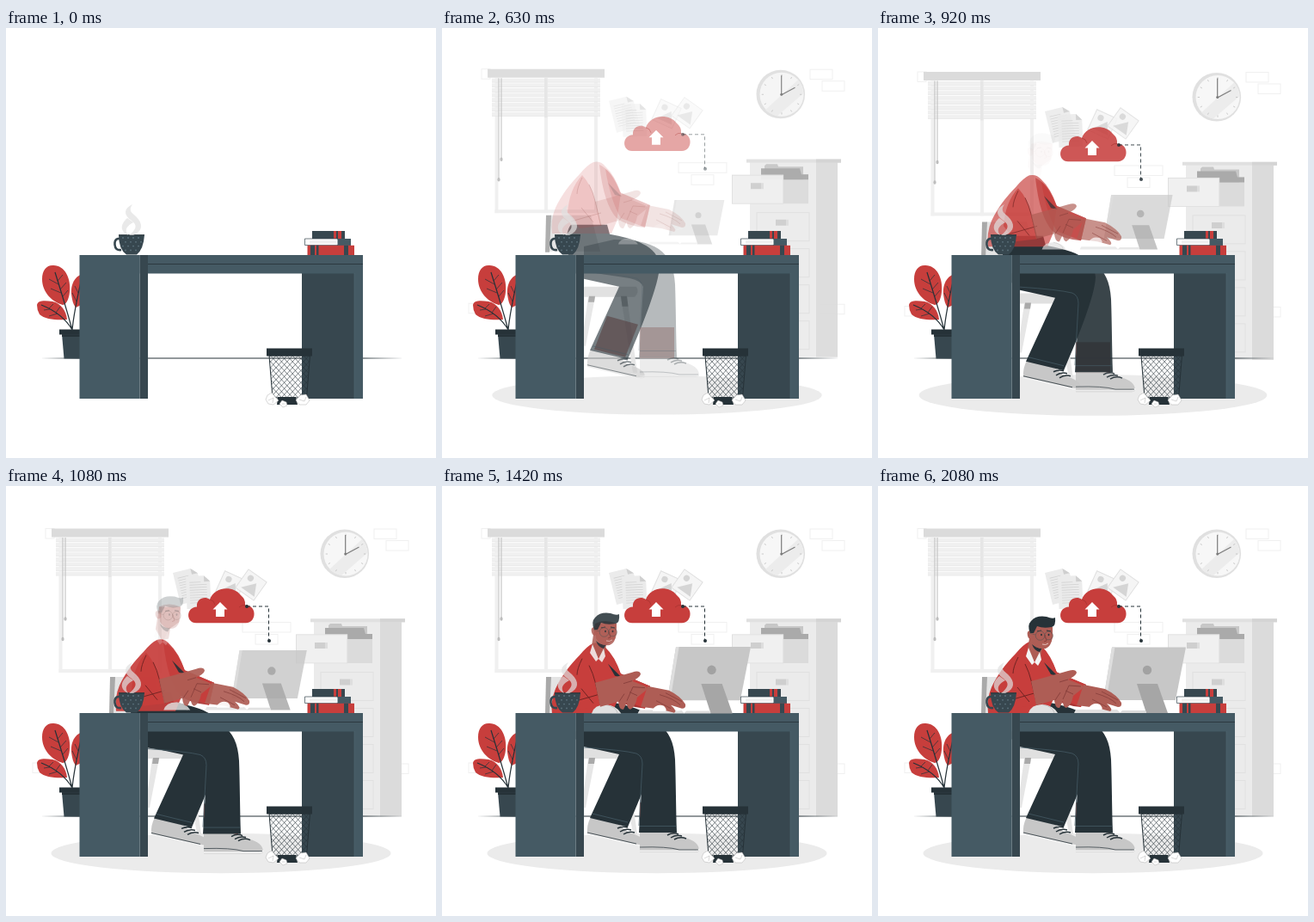
An HTML page with a canvas for the animation above (2120 ms loop, 500 by 500 pixels).

```html
<!DOCTYPE html>
<html lang="en">
<head>
<meta charset="utf-8">
<title>Working at the desk</title>
<style>
html, body { margin: 0; width: 100%; height: 100%; overflow: hidden; background: #fff; }
canvas { display: block; width: 500px; height: 500px; }
</style>
</head>
<body>
<canvas id="stage"></canvas>
<script>
const canvas = document.getElementById('stage');
const ctx = canvas.getContext('2d');
const dpr = window.devicePixelRatio || 1;
canvas.width = canvas.height = 500 * dpr;

const LOOP = 2120, FPS = 24;
const INK = '#263238', SLATE = '#455a64', DEEP = '#37474f';
const RED = '#c73e3c', SKIN = '#ae5d55', PALE = '#ebebeb';

// Drawing helpers
const paths = new Map();
const path = d => {
  if (!paths.has(d)) paths.set(d, new Path2D(d));
  return paths.get(d);
};
function fill(color, d) { ctx.fillStyle = color; ctx.fill(path(d)); }
function line(color, w, d) { ctx.strokeStyle = color; ctx.lineWidth = w; ctx.stroke(path(d)); }
function rect(color, x, y, w, h) { ctx.fillStyle = color; ctx.fillRect(x, y, w, h); }
function box(color, w, x, y, bw, bh) { ctx.strokeStyle = color; ctx.lineWidth = w; ctx.strokeRect(x, y, bw, bh); }
function oval(color, x, y, rx, ry = rx, turn = 0) {
  ctx.fillStyle = color;
  ctx.beginPath();
  ctx.ellipse(x, y, rx, ry, turn, 0, 7);
  ctx.fill();
}
function ring(color, w, x, y, r) {
  ctx.strokeStyle = color;
  ctx.lineWidth = w;
  ctx.beginPath();
  ctx.arc(x, y, r, 0, 7);
  ctx.stroke();
}

// Easing
function bezier(x1, y1, x2, y2) {
  const at = (a, b, u) => 3 * (1 - u) * (1 - u) * u * a + 3 * (1 - u) * u * u * b + u * u * u;
  return x => {
    if (x <= 0) return 0;
    if (x >= 1) return 1;
    let lo = 0, hi = 1;
    for (let i = 0; i < 24; i++) {
      const mid = (lo + hi) / 2;
      if (at(x1, x2, mid) < x) lo = mid; else hi = mid;
    }
    return at(y1, y2, lo);
  };
}
const back = bezier(.36, -.01, .5, 1.38);
const easeIn = bezier(.42, 0, 1, 1);

function slide(p, dist, draw) {
  if (p <= 0) return;
  ctx.save();
  ctx.globalAlpha = Math.min(1, p);
  ctx.translate(0, dist * (p - 1));
  draw();
  ctx.restore();
}
function zoom(p, x, y, draw) {
  if (p <= 0) return;
  const s = .5 + p / 2;
  ctx.save();
  ctx.globalAlpha = Math.min(1, p);
  ctx.translate(x, y);
  ctx.scale(s, s);
  ctx.translate(-x, -y);
  draw();
  ctx.restore();
}

// Scenery
function bricks() {
  for (const [x, y, w] of [[428, 50, 26], [442, 63.5, 26], [275, 158.5, 56], [290, 172.5, 26], [46, 49.5, 10], [31, 322, 24], [440, 323, 28]])
    box('#f0f0f0', 1, x, y, w, 11.5);
}

function blinds() {
  for (const x of [61.5, 119, 177]) rect('#f0f0f0', x, 60, 4, 157);
  rect('#f0f0f0', 61.5, 213, 119.5, 4);
  for (let y = 60.5; y < 104; y += 5.6) {
    rect('#f0f0f0', 58, y, 126, 4.6);
    rect('#e8e8e8', 58, y + 4, 126, .7);
  }
  rect('#e6e6e6', 119, 60, 3.5, 46);
  rect('#dbdbdb', 53, 49.5, 136, 10);
  line('#bdbdbd', 1, 'M66 60V178 M69 60V155');
  oval('#bdbdbd', 66, 178, 1.6, 2.2);
  oval('#bdbdbd', 69, 154.5, 1.6, 2.2);
}

function clock() {
  oval('#e0e0e0', 393.8, 78.8, 28.3);
  oval('#f7f7f7', 395, 79, 25.5);
  fill('#ececec', 'M376 97L414 62Q420 69 420 78L390 104Q381 102 376 97Z');
  ctx.strokeStyle = '#bdbdbd';
  ctx.lineWidth = .8;
  ctx.beginPath();
  for (let i = 0; i < 12; i++) {
    const c = Math.cos(i * Math.PI / 6), s = Math.sin(i * Math.PI / 6);
    ctx.moveTo(395 + 21 * c, 79 + 21 * s);
    ctx.lineTo(395 + 23.3 * c, 79 + 23.3 * s);
  }
  ctx.stroke();
  line('#7c7c7c', 1.2, 'M394.7 57V79.5L410.5 71');
  oval('#7c7c7c', 394.7, 79, 1.5);
}

function cabinet() {
  rect(PALE, 358, 158, 77, 226.5);
  rect('#dbdbdb', 435, 158, 25, 226.5);
  rect('#e0e0e0', 354, 154.3, 110, 4);
  rect('#d4d4d4', 435, 154.3, 29, 4);
  for (let i = 0; i < 4; i++) {
    const y = 216.5 + i * 42;
    box('#e0e0e0', 1, 366, y, 61, 33);
    rect('#cfcfcf', 388, y + 8, 12, 7);
    rect('#dedede', 400, y + 8, 3, 7);
  }
  rect('#dbdbdb', 397, 172, 29, 34);
  fill('#c7c7c7', 'M375 162L377 160H390L391 163H420V178H375Z');
  fill('#aaaaaa', 'M371 165H416L418 172H426V178H371Z');
  rect('#f0f0f0', 337, 172.5, 60, 33.5);
  box('#dedede', .8, 337.4, 172.9, 59.4, 33);
  rect('#cfcfcf', 359, 182, 12, 7);
  rect('#dedede', 371, 182, 3, 7);
}

function sky() {
  bricks();
  blinds();
  clock();
  cabinet();
}

function sheet(x, y, turn) {
  ctx.save();
  ctx.translate(x, y);
  ctx.rotate(turn);
  fill('#ebebeb', 'M0 0H21L28 7V38H0Z');
  fill('#cfcfcf', 'M21 0V7H28Z');
  for (let i = 0; i < 9; i++) rect('#d3d3d3', 4, 7 + i * 3, i < 1 ? 13 : 20, .8);
  ctx.restore();
}

function photo(x, y, turn) {
  ctx.save();
  ctx.translate(x, y);
  ctx.rotate(turn);
  rect('#f5f5f5', -13, -13, 26, 26);
  box('#e0e0e0', 1, -13, -13, 26, 26);
  oval('#d5d5d5', -5, -6, 3.6);
  fill('#d5d5d5', 'M-8 9L4 -5L11 9Z');
  ctx.restore();
}

function upload() {
  sheet(194, 101, -.24);
  sheet(209, 105, -.04);
  photo(261, 116, .43);
  photo(285, 115, .62);
  // the arrow winds the other way, so it stays open
  fill(RED, 'M221 159.3C209 159 209 141 222 140.5C221 131 231 127.5 237 132C242 117 264 115 273 127Q279 132 278 138.5C292 138 292 159 279 159.3Z M240.5 143.5H244V152H254V143.5H257.5L249 135Z');
  line('#a93432', .8, 'M237 132Q242 133 243 138 M278 138.5Q274 138 271 141');
  ctx.setLineDash([4, 3]);
  line(INK, 1, 'M280 140H305.5V179');
  ctx.setLineDash([]);
  oval(INK, 280, 140, 2);
  oval(INK, 306, 180, 2);
}

function plant() {
  fill(RED, 'M54 276C68 275 76 291 74 307C73 317 69 322 66 322C55 319 42 308 42 292C42 282 47 276 54 276Z');
  fill(RED, 'M92 286C82 286 75 296 76 309Q77 320 81 325L92 320Z');
  fill(RED, 'M36 322C37 316 46 317 54 318C64 320 70 329 71 339C60 340 45 339 39 333Q36 328 36 322Z');
  line(INK, 1.2, 'M77 351Q69 322 57 284 M77 351Q66 332 41 322 M77 351Q79 330 88 291');
  line(INK, .7, 'M60 294L66 287M63 304L70 296M66 312L72 305M61 298L50 292M64 308L52 303M50 326L55 321M58 331L63 324M51 327L44 328M60 332L50 335M82 318L77 308M84 308L80 300');
  fill(DEEP, 'M65 356H94L91 384.5H67.5Z');
  rect(INK, 62, 350.5, 34, 6);
  rect(INK, 65, 356.5, 30, 2.5);
}

function chair() {
  fill('#e4e4e4', 'M126 222H173L184 264H125Z');
  fill('#a9a9a9', 'M121 222H127L125 265H120Z');
  fill('#e0e0e0', 'M160 305H226Q230 311 224 317H160Z');
  fill('#e6e6e6', 'M170 317H178L167 374H162Z M208 317H215L227 405H222Z');
  fill('#a9a9a9', 'M171 316H178L177 323H170Z M208 316H215L216.5 328H209.5Z');
}

// Person
function rearLeg() {
  fill(SKIN, 'M192 346L228 356L213 394L177 385Z');
  fill('#c7c7c7', 'M173 385L207 394Q213 402 224 405Q237 410 236 417Q234 420 225 418L169 405Q168 394 173 385Z');
  line('#f2f2f2', 1.8, 'M169 404.5L226 417.5Q232 419 236 416');
  line(INK, .8, 'M169 403L226 416');
  fill(INK, 'M150 240L192 240L195 251C222 256 252 264 253 288C252 310 234 355 216 396.5L172 386L206 312L165 303C145 293 140 250 150 240Z');
  line(SLATE, .8, 'M175 381L216 391');
  line(INK, 1.5, 'M204 398Q210 395 216 397M207 402Q213 398 220 400M211 405Q217 401 224 403');
}

function frontLeg() {
  fill(SKIN, 'M230 368H270V404H230Z');
  fill('#c7c7c7', 'M230 402H262Q276 405 282 409Q299 413 299 424Q298 426 293 426H230Z');
  line('#f2f2f2', 1.8, 'M230 424.5H293Q298 425 299 422');
  line(INK, .7, 'M230 420Q262 419 276 423H298');
  fill(INK, 'M165 274L200 266C246 266 269 278 271 318C272 345 272 375 273 403H229L234 321Q232 314 218 311L165 303Z');
  line(SLATE, .8, 'M165 304Q210 307 226 311Q233 314 233 323L229 395 M230 395.5H272');
  line(INK, 1.5, 'M262 406Q269 402 275 405M266 409Q272 405 279 407M270 411Q277 407 284 410');
}

function torso() {
  fill('#a93432', 'M183 184Q197 190 207 216L242 231L236 257Q214 255 203 246Q188 230 183 184Z');
  fill(RED, 'M190 189Q199 194 208 217L242 231L236 257L208 246Q196 226 190 189Z');
  fill(RED, 'M128 264Q126 248 132 234C139 219 149 206 160 195Q169 184 176 181Q184 179 190 186Q201 196 208 217L203 250L197 264Z');
  fill(RED, 'M163 196Q148 212 146 240L160 258L185 255L178 226Q174 208 163 196Z');
  fill(INK, 'M193 205L209 221L201 219Z');
  line('#702423', 1, 'M171 207Q176 217 178 226L185 255 M150 250L185 240 M162 234L176 251 M163 199Q157 211 157 218');
}

function hands() {
  fill(SKIN, 'M239 231L264 236Q278 243 283 252Q284 257 279 257L266 253Q274 260 270 262L255 258L231 255Z');
  line('#873f3b', .8, 'M253 241Q270 246 277 253 M249 248L266 257 M260 239L279 249');
  fill(SKIN, 'M178 227Q200 221 221 215Q230 212 231 217Q230 221 221 225L236 231Q240 233 237 236L227 244Q225 255 219 258Q215 257 215 250L211 258Q206 259 205 249L184 255Z');
  line('#873f3b', .9, 'M221 225L211 228 M236 233L222 232L215 248 M227 242L218 238 M206 249L212 240');
  fill('#fff', 'M245 258Q250 251 258 254Q262 258 260 260H245Z M272 260Q276 255 280 259Z');
}

function head() {
  fill(SKIN, 'M178 164L203 164L201 182L191 189L189 201L181 203L174 190Z');
  fill(INK, 'M179 184Q186 190 191 188L188 193Q182 192 179 184Z');
  fill('#f4f4f4', 'M175 188L182 205L179 208L172 198Z M182 205L188 193L190 202L186 209Z');
  fill(SKIN, 'M178 164Q189 158 203 164L203 176Q201 187 195 189Q184 191 179 181Z');
  oval(SKIN, 177, 173, 3.2, 4.8, -.2);
  fill(INK, 'M177 171Q173 162 178 157Q184 150 196 152Q203 155 206 153Q207 163 202 164Q192 166 185 163L181 171Z');
  line(INK, 1.1, 'M185 169L190 168 M196 168L201 169');
  ring('#6b5653', .8, 188.5, 174, 5.3);
  ring('#6b5653', .8, 198.5, 174, 4.8);
  line('#6b5653', .7, 'M183 173L176 171 M193.5 173H194');
  oval(INK, 190, 173, .9, 1.3);
  oval(INK, 198.5, 173, .9, 1.3);
  line('#873f3b', .9, 'M194 173L196 180L193 181');
  line('#f1d6d2', .8, 'M191 184Q195 185.5 198 183');
}

// Furniture and desk items
function desk() {
  rect(DEEP, 344, 284, 62, 147);
  rect(SLATE, 155, 264, 260, 21.5);
  rect(SLATE, 405, 264, 10, 167);
  rect(SLATE, 85.5, 264, 70, 167);
  rect(DEEP, 155.5, 264, 9.5, 167);
  line(INK, .8, 'M165 274.5H415');
  line('#71828a', .6, 'M155.5 264V431');
  line('#536872', .6, 'M405 285V431');
}

function computer() {
  fill('#c7c7c7', 'M272 187.5H358L346 249H262Z');
  fill('#dedede', 'M272 187.5H275.5L265.5 249H262Z');
  oval('#a2a2a2', 313, 214, 5.2);
  fill('#a6a6a6', 'M301 230H325L337 264H312Z');
  fill('#dbdbdb', 'M284 261H311L312 264H281Z');
  fill('#e0e0e0', 'M230 260H278L282 264H228Z');
  fill('#e0e0e0', 'M175 264Q178 254 191 254Q204 255 209 264Z');
  line('#b5b5b5', .7, 'M191 254Q203 256 205 264');
}

function cup() {
  line(DEEP, 2.6, 'M134 245H130Q126 246 126.5 252Q127 259 134 258');
  fill(DEEP, 'M131 240.5H161Q160 257 152 263.5H140Q131 257 131 240.5Z');
  for (let r = 0; r < 4; r++)
    for (let i = 0; i < 4 - (r > 2); i++) oval('#5d737e', 136 + i * 6 + (r % 2) * 3, 244 + r * 4.8, .9);
  rect(INK, 131, 240.3, 30, 1);
}

function steam() {
  ctx.save();
  ctx.globalAlpha = .7;
  fill('#e0e0e0', 'M147 205C142 212 146 215 151 219C160 228 159 236 148 241H143C152 234 153 229 146 224C136 217 137 210 147 205Z M141 221C133 228 132 236 142 241C137 234 141 230 148 226Z');
  ctx.restore();
}

function books() {
  rect(DEEP, 356, 236, 38, 9);
  rect(RED, 381, 236, 3, 9);
  rect(RED, 386, 236, 4, 9);
  rect(SLATE, 385, 245, 16, 8);
  rect('#fff', 347.5, 245.5, 38, 7);
  line(DEEP, .7, 'M386 245H347.5V252.5H386');
  line('#cfcfcf', .6, 'M353 248H384M353 250H384');
  rect(RED, 350.5, 252.8, 54.5, 11.2);
  rect(DEEP, 354, 252.8, 5, 11.2);
  rect(DEEP, 361, 252.8, 2.5, 11.2);
  rect(DEEP, 393, 252.8, 5, 11.2);
}

function bin() {
  const body = 'M306 381H353.5L349.5 430H310Z';
  ctx.save();
  ctx.clip(path(body));
  ctx.strokeStyle = INK;
  ctx.lineWidth = .6;
  ctx.beginPath();
  for (let x = 250; x < 410; x += 6.4) {
    ctx.moveTo(x, 381);
    ctx.lineTo(x + 46, 431);
    ctx.moveTo(x, 381);
    ctx.lineTo(x - 46, 431);
  }
  ctx.stroke();
  ctx.restore();
  line(INK, 1, body);
  rect(INK, 303, 372.5, 53, 9);
  fill(INK, 'M316 429H337L339 438H315Z');
  for (const d of ['M304 427L309 424L313 429L317 433L311 438L305 437L302 432Z', 'M337 433L342 427L349 426L353 433L349 438L341 438Z', 'M318 437L321 433L326 435L327 439L322 441Z']) {
    fill('#fff', d);
    line('#b0b0b0', .5, d);
  }
  line('#b0b0b0', .5, 'M305 433L311 430L310 436M341 432L347 434L349 429M321 437L324 437');
}

function draw(t) {
  const run = (ease, start, dur) => ease((t - start) / dur);
  const scene = run(back, 0, 1000);
  const data = run(easeIn, 0, 1000);
  const rear = run(back, 250, 850);
  const front = run(back, 320, 1000);
  const body = run(back, 380, 1150);
  const face = run(back, 830, 1030);
  const screen = run(back, 0, 2000);

  ctx.setTransform(dpr, 0, 0, dpr, 0, 0);
  ctx.fillStyle = '#fff';
  ctx.fillRect(0, 0, 500, 500);

  zoom(scene, 250, 427, () => oval(PALE, 250, 427, 197.5, 23.3));
  slide(scene, 30, sky);
  fill(INK, 'M40 384L86 383.6H415L463 384L415 384.4H86Z');
  slide(data, 30, upload);
  plant();
  slide(scene, 71, chair);
  slide(rear, 30, rearLeg);
  slide(front, 30, frontLeg);
  slide(body, 30, torso);
  slide(face, 30, head);
  desk();
  zoom(screen, 267, 225.5, computer);
  slide(body, 30, hands);
  cup();
  steam();
  books();
  bin();
}

let began = null;
function tick(now) {
  if (began === null) began = now;
  const ms = (now - began) % LOOP;
  const step = Math.floor((ms + 5) * FPS / 1000);
  draw(step < 5 ? 0 : step * 1000 / FPS);
  requestAnimationFrame(tick);
}
draw(0);
requestAnimationFrame(tick);
</script>
</body>
</html>
```
